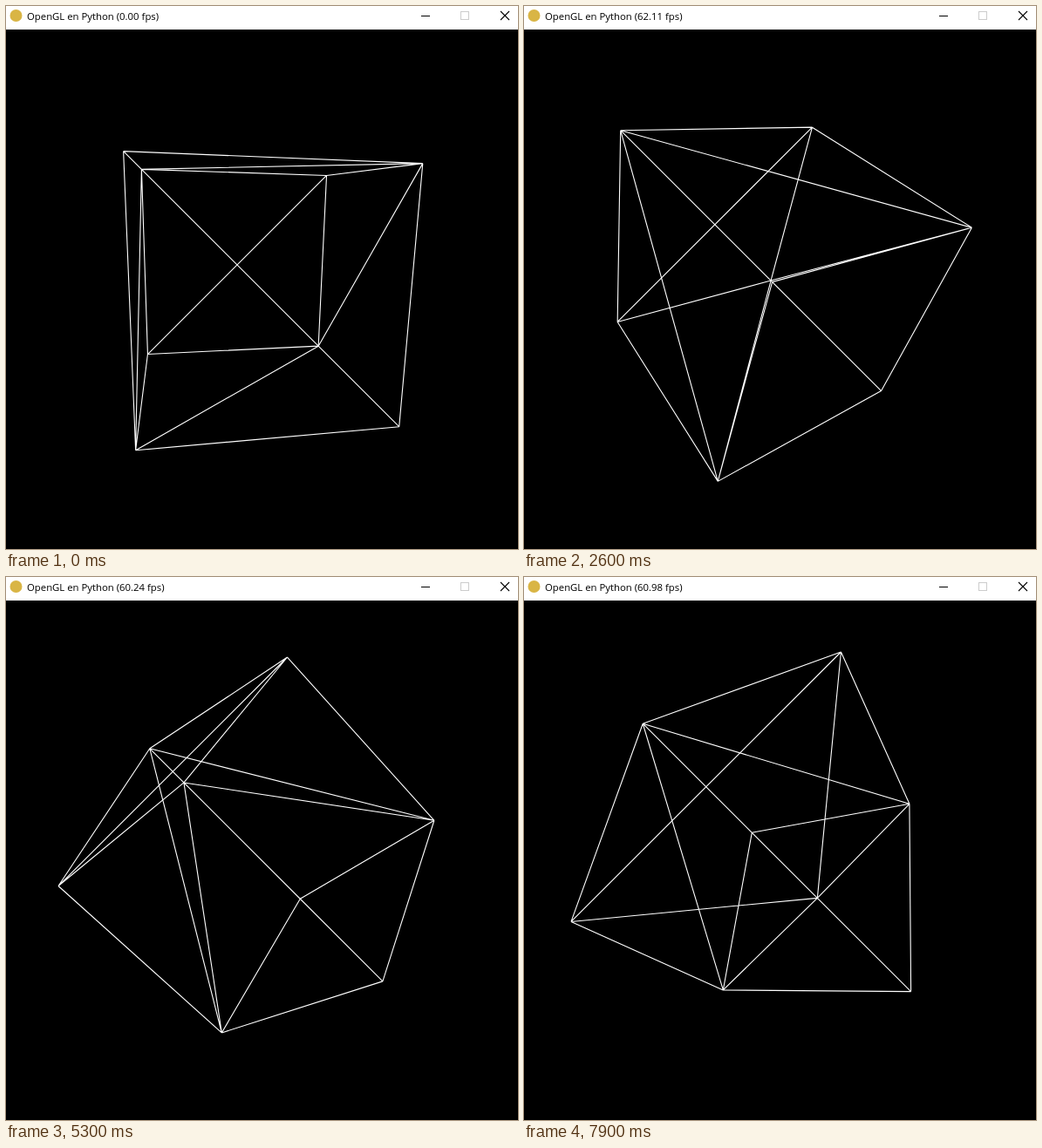
Animation, 587 px wide and 623 px high, one loop 8000 ms. Source, as an HTML page:

```html
<!DOCTYPE html>
<html lang="fr">
<head>
<meta charset="utf-8">
<title>OpenGL en Python</title>
<style>
  html, body { margin: 0; width: 100%; height: 100%; overflow: hidden; background: #000; }
  svg { display: block; width: 587px; height: 623px; }
  text { font: 11.35px "Open Sans", "Noto Sans", sans-serif; fill: #000; }
</style>
</head>
<body>
<svg viewBox="0 0 587 623">
  <rect width="587" height="623" fill="#000"/>
  <rect width="587" height="27" fill="#fff"/>
  <circle cx="11.5" cy="11" r="7" fill="#d9b545"/>
  <text id="title" x="24" y="16"></text>
  <g fill="none" stroke="#000">
    <path d="M476 11.5h10" shape-rendering="crispEdges"/>
    <rect x="521.5" y="6.5" width="9" height="9" stroke="#ccc" shape-rendering="crispEdges"/>
    <path d="M567 6l10 10m0 -10l-10 10" stroke-width="1.1"/>
  </g>
  <path id="cube" fill="none" stroke="#fff" stroke-width="1.1"/>
</svg>
<script>
const LOOP = 8000, STEP = 100;
const CENTER = { x: 283.5, y: 315.5 };
const SCALE = 89.35;
const DEPTH = 0.2427;   // half edge over camera distance
const SKEW = -0.037;    // the cube sits off the optical axis
const START = 16.9, SPEED = 15.46; // degrees, degrees per second

// p: across the rotation axis, q: along it, z: towards the viewer
const R = Math.SQRT2;
const corners = {
  A: [-R, 0, 1], B: [0, R, 1], C: [0, -R, 1], D: [R, 0, 1],
  E: [-R, 0, -1], F: [0, R, -1], G: [0, -R, -1], H: [R, 0, -1]
};
const edges = "AB AC BD CD EF EG FH GH BF CG AE DH FG EH AD BE CE BH CH".split(" ");

const title = document.getElementById("title");
const cube = document.getElementById("cube");

function project([p, q, z], angle) {
  const cos = Math.cos(angle), sin = Math.sin(angle);
  const across = p * cos + z * sin;
  const near = z * cos - p * sin;
  const k = SCALE / (1 - DEPTH * near);
  const shift = across + SKEW * near;
  return (CENTER.x + k * (shift + q)).toFixed(2) + " " +
         (CENTER.y + k * (shift - q)).toFixed(2);
}

function fps(step) {
  if (step === 0) return "0.00";
  if (step >= 25 && step < 28) return "62.11";
  return step >= 78 ? "60.98" : "60.24";
}

function render(time) {
  const step = Math.floor((time % LOOP) / STEP);
  const angle = (START + SPEED * step * STEP / 1000) * Math.PI / 180;
  const points = {};
  for (const name in corners) points[name] = project(corners[name], angle);
  cube.setAttribute("d", edges.map(([a, b]) => `M${points[a]}L${points[b]}`).join(""));
  title.textContent = `OpenGL en Python (${fps(step)} fps)`;
}

let origin;
function tick(now) {
  origin ??= now;
  render(now - origin);
  requestAnimationFrame(tick);
}
render(0);
requestAnimationFrame(tick);
</script>
</body>
</html>
```
